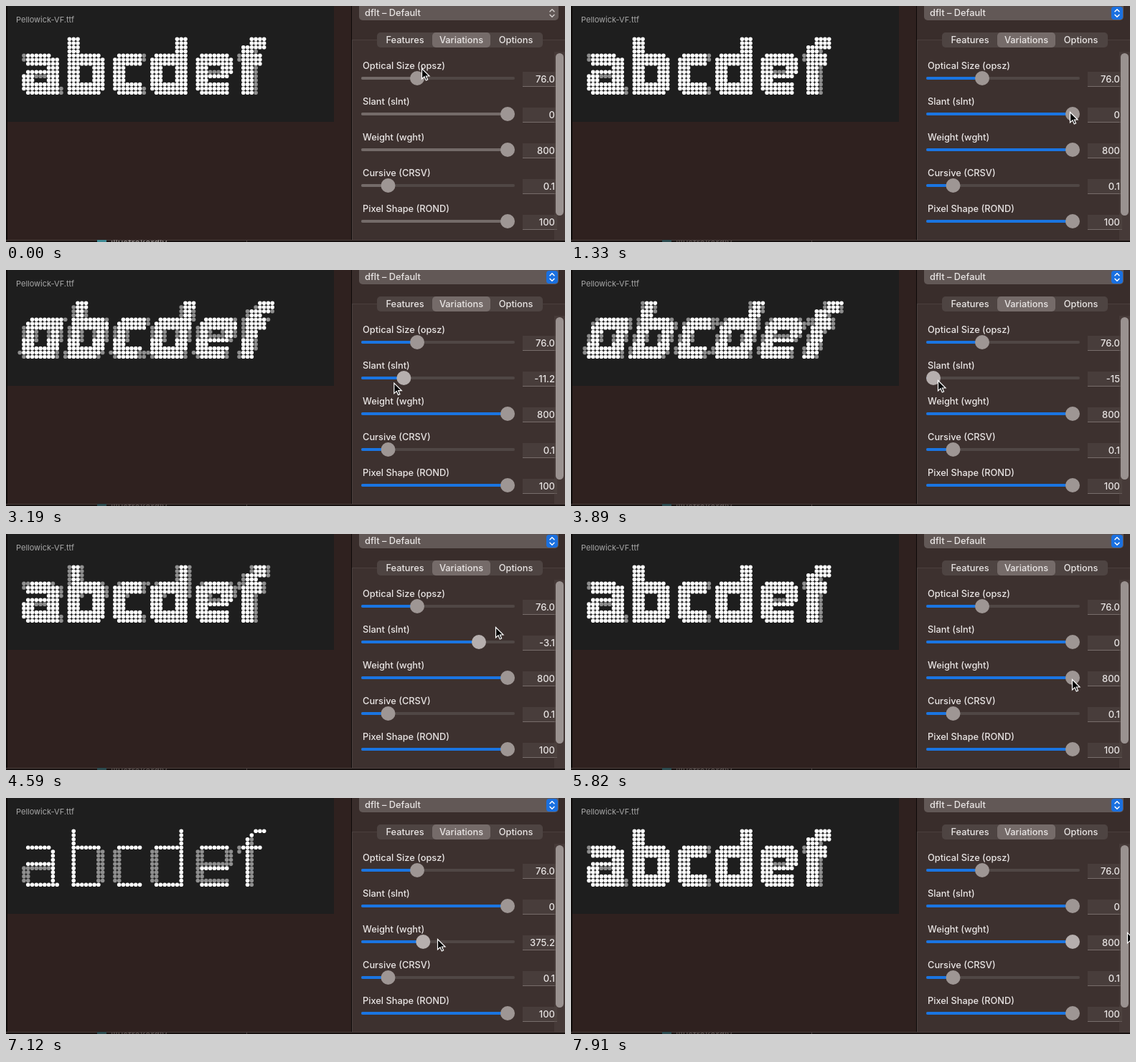
An HTML page with a canvas that plays this animation: 779 px wide and 330 px high, repeating every 8000 ms.

```html
<!DOCTYPE html>
<html lang="en">
<head>
<meta charset="utf-8">
<style>
html, body { margin: 0; width: 779px; height: 330px; overflow: hidden; background: #2f211f; }
canvas { display: block; }
</style>
</head>
<body>
<canvas id="stage" width="779" height="330"></canvas>
<script>
const ctx = document.getElementById('stage').getContext('2d');
const LOOP = 8000, TICK = 88, LAST_TICK = 90;
const ACTIVATE = 15;
const SLANT_DRAG = [25, 54], WEIGHT_DRAG = [68, 90];
const KNOB_MIN = 505, KNOB_MAX = 699;
const PITCH = 5.77, COLS = 66, ROWS = 14, PIVOT = 10.3;

// Pointer path: [tick, x, y]
const POINTER = [
  [0, 579, 87], [7, 688, 143], [10, 688, 143], [12, 695, 148], [24, 695, 148],
  [28, 651, 151], [29, 639, 152], [39, 498, 160], [43, 504, 155], [44, 511, 154],
  [51, 659, 132], [52, 682, 130], [54, 709, 131], [57, 762, 150], [61, 757, 217],
  [64, 700, 205], [66, 698, 203], [67, 697, 203], [75, 503, 200], [77, 519, 199],
  [80, 581.27, 197], [81, 601, 197], [87, 731, 190], [90, 775, 188]
];

// Strokes: x, y, width, height in grid cells, growth, strength.
// Each l or r grows that side by half a cell at full weight, each u or d by two cells.
const GLYPHS = {
  a: [[1, 4, 6, 1, 'd'], [7, 5, 1, 9, 'llrr'], [1, 8, 6, 1.6, ''], [.5, 9, 1, 4, 'lrrr'],
      [1, 13, 8, 1, 'u'], [1, 4, 0, 2, 'll', .5], [9, 12, 0, 2, 'rr', .5]],
  cursiveA: [[1, 4, 6, 1, 'd'], [7, 4, 1, 10, 'llrr'], [.5, 5, 1, 8, 'lrrr'], [1, 13, 7, 1, 'u']],
  b: [[12, 0, 1, 14, 'llrr'], [13, 4, 6, 1, 'd'], [18.5, 5, 1, 8, 'lllr'], [13, 13, 6, 1, 'u']],
  c: [[22.5, 5, 1, 8, 'lrrr'], [23, 4, 6, 1, 'd'], [23, 13, 6, 1, 'u'],
      [29, 4, 0, 2, 'rr', .5], [29, 12, 0, 2, 'rr', .5]],
  d: [[38, 0, 1, 14, 'llrr'], [32, 4, 6, 1, 'd'], [31.5, 5, 1, 8, 'lrrr'], [32, 13, 6, 1, 'u']],
  e: [[42.5, 5, 1, 8, 'lrrr'], [43, 4, 7, 1, 'd'], [49.5, 5, 1, 4, 'lllr'], [43, 8.6, 7, 1.4, ''],
      [43, 13, 7, 1, 'u'], [44, 12, 6, 1, '', .5]],
  f: [[54, 2, 1.4, 12, 'llrr'], [56, 0, 3, 1, 'lld'], [55, 1, 1, 1, 'd'],
      [53, 4, 5, 1, 'd'], [52, 4, 1, 2, '', .5]]
};

const clamp = (v, lo, hi) => Math.min(hi, Math.max(lo, v));
const between = (v, [lo, hi]) => v >= lo && v <= hi;
const overlap = (a, b, cell) => Math.max(0, Math.min(b, cell + 1) - Math.max(a, cell));
const count = (text, ch) => text.split(ch).length - 1;
const format = v => String(+v.toFixed(1) || 0);

function pointerAt(tick) {
  let i = 1;
  while (i < POINTER.length - 1 && POINTER[i][0] < tick) i++;
  const [t0, x0, y0] = POINTER[i - 1], [t1, x1, y1] = POINTER[i];
  const p = clamp((tick - t0) / (t1 - t0), 0, 1);
  return { x: x0 + (x1 - x0) * p, y: y0 + (y1 - y0) * p };
}

// A dragged knob trails the pointer by one tick.
function knobAt(tick, drag) {
  return between(tick, drag) ? clamp(pointerAt(tick - 1).x, KNOB_MIN, KNOB_MAX) : KNOB_MAX;
}

function rect(x, y, w, h, color) {
  ctx.fillStyle = color;
  ctx.fillRect(x, y, w, h);
}

function pill(x, y, w, h, r, color) {
  ctx.fillStyle = color;
  ctx.beginPath();
  ctx.roundRect(x, y, w, h, r);
  ctx.fill();
}

function disc(x, y, r, color) {
  ctx.fillStyle = color;
  ctx.beginPath();
  ctx.arc(x, y, r, 0, Math.PI * 2);
  ctx.fill();
}

function label(text, x, y, { size = 12.8, weight = 500, color = '#e9e5e4', align = 'left' } = {}) {
  ctx.font = `${weight} ${size}px Inter, sans-serif`;
  ctx.textAlign = align;
  ctx.fillStyle = color;
  ctx.fillText(text, x, y);
}

function drawSample(slant, weight) {
  const growth = Math.max(0, (weight - 400) / 400);
  const side = growth / 2, bar = growth * 2;
  const shear = Math.tan(-slant * Math.PI / 180);
  const levels = new Float32Array(COLS * ROWS);
  const { a, cursiveA, ...rest } = GLYPHS;
  const strokes = [slant < -8 ? cursiveA : a, ...Object.values(rest)].flat();

  for (const [x, y, w, h, grow, strength = 1] of strokes) {
    const top = y - bar * count(grow, 'u'), bottom = y + h + bar * count(grow, 'd');
    const left = x - side * count(grow, 'l'), right = x + w + side * count(grow, 'r');
    for (let row = Math.floor(top); row < Math.min(ROWS, bottom); row++) {
      const shift = (PIVOT - row) * shear;
      const cover = overlap(top, bottom, row) * strength;
      for (let col = Math.floor(left + shift); col < right + shift; col++) {
        const i = row * COLS + col + 2;
        levels[i] = Math.max(levels[i], cover * overlap(left + shift, right + shift, col));
      }
    }
  }
  levels.forEach((level, i) => {
    if (level < .15) return;
    const x = 25 + (i % COLS - 2) * PITCH, y = 46.2 + Math.floor(i / COLS) * PITCH;
    disc(x, y, 2.8, level > .7 ? '#ffffff' : '#8f8f8f');
  });
}

function drawSlider(i, name, knob, value, active, lit) {
  const y = 101 + i * 50;
  label(name, 497, y - 13);
  pill(495, y - 2, 214, 4, 2, '#504745');
  pill(495, y - 2, knob - 495, 4, 2, active ? '#1a75e2' : '#746b69');
  disc(knob, y, 10, lit ? '#b6afae' : '#9e9694');
  rect(720, y - 9, 48, 20, '#483d3b');
  rect(720, y + 11, 48, 1, '#776d6b');
  label(value, 765, y + 6, { size: 13, align: 'right' });
}

function drawChevrons(color) {
  ctx.strokeStyle = color;
  ctx.lineWidth = 1.5;
  ctx.lineCap = ctx.lineJoin = 'round';
  ctx.beginPath();
  for (const d of [-1, 1]) {
    ctx.moveTo(758, 10 + 2.3 * d);
    ctx.lineTo(761, 10 + 5.3 * d);
    ctx.lineTo(764, 10 + 2.3 * d);
  }
  ctx.stroke();
}

function drawHeader(active) {
  pill(492, -4, 278, 24, 5, '#625856');
  if (active) pill(753, 1, 16, 18, 4, '#1a70e0');
  drawChevrons(active ? '#ffffff' : '#d2cccb');
  label('dflt – Default', 500, 14);

  rect(482, 47, 297, 281, '#4b403e');
  rect(483, 48, 296, 280, '#3d312f');
  pill(517, 37, 231, 21, 5, '#4e4442');
  pill(594, 37, 81, 21, 5, '#756b69');
  label('Features', 556, 52, { align: 'center' });
  label('Variations', 634.5, 52, { align: 'center' });
  label('Options', 710.5, 52, { align: 'center' });
}

function drawBottomEdge(active) {
  rect(0, 327, 779, 1, '#4b403e');
  rect(0, 328, 779, 2, '#171110');
  ctx.save();
  ctx.beginPath();
  ctx.rect(0, 327, 779, 3);
  ctx.clip();
  rect(127, 327, 13, 3, active ? '#2b4a4e' : '#3f8a94');
  label('illustrokerdly', 146, 335, { color: active ? '#554b49' : '#8d8583' });
  rect(335, 328, 1, 2, '#4b403e');
  ctx.restore();
}

function drawPointer({ x, y }) {
  ctx.save();
  ctx.translate(x, y);
  ctx.beginPath();
  ctx.moveTo(.5, .5);
  for (const [px, py] of [[.5, 15], [4, 11.8], [6.3, 17], [8.6, 16], [6.4, 11], [11, 11]]) ctx.lineTo(px, py);
  ctx.closePath();
  ctx.fillStyle = '#000';
  ctx.strokeStyle = '#fff';
  ctx.lineWidth = 1.2;
  ctx.lineJoin = 'miter';
  ctx.fill();
  ctx.stroke();
  ctx.restore();
}

function draw(time) {
  const tick = Math.min(LAST_TICK, Math.floor((time % LOOP + 20) / TICK));
  const active = tick >= ACTIVATE;
  const slantKnob = knobAt(tick, SLANT_DRAG), weightKnob = knobAt(tick, WEIGHT_DRAG);
  const span = KNOB_MAX - KNOB_MIN;
  const slant = -15 * (KNOB_MAX - slantKnob) / span;
  const weight = 100 + 700 * (weightKnob - KNOB_MIN) / span;

  rect(0, 0, 779, 330, '#2f211f');
  rect(0, 0, 2, 330, '#0d0908');
  rect(2, 0, 455, 162, '#1e1e1e');
  label('Pellowick-VF.ttf', 14, 23, { size: 11, weight: 400, color: '#a8a8a8' });
  drawSample(slant, weight);

  rect(481, 0, 1, 328, '#0d0908');
  rect(482, 0, 297, 328, '#392d2b');
  drawHeader(active);
  drawSlider(0, 'Optical Size (opsz)', 573, '76.0', active, false);
  drawSlider(1, 'Slant (slnt)', slantKnob, format(slant), active,
    between(tick, [20, 22]) || between(tick, SLANT_DRAG));
  drawSlider(2, 'Weight (wght)', weightKnob, format(weight), active, between(tick, WEIGHT_DRAG));
  drawSlider(3, 'Cursive (CRSV)', 532.5, '0.1', active, false);
  drawSlider(4, 'Pixel Shape (ROND)', 699, '100', active, false);

  rect(764, 64, 15, 263, 'rgba(80,69,67,.45)');
  pill(766, 66, 11, 227, 5.5, '#9a9290');
  drawBottomEdge(active);
  drawPointer(pointerAt(tick));
}

function loop() {
  draw(performance.now());
  requestAnimationFrame(loop);
}
loop();
</script>
</body>
</html>
```
